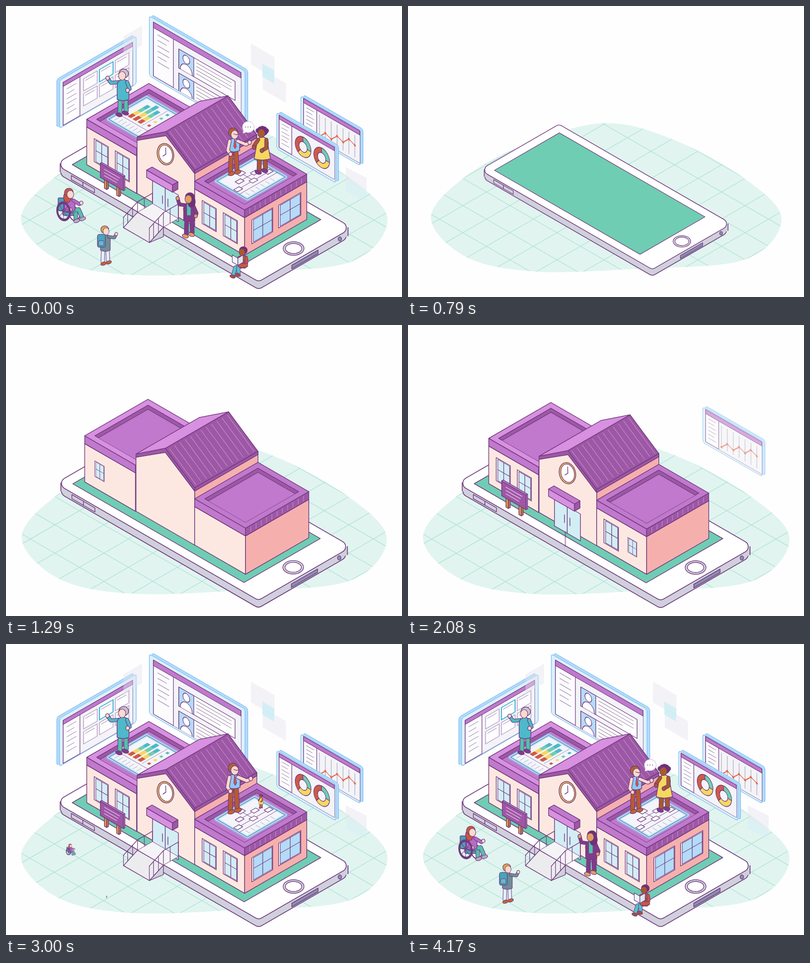
These frames come from a looping animation (873 by 642 pixels, 10 s). An HTML page with a canvas:

```html
<!DOCTYPE html>
<html lang="en">
<head>
<meta charset="utf-8">
<title>School on a phone</title>
<style>
html, body { margin: 0; width: 100%; height: 100%; overflow: hidden; background: #fefefe; }
canvas { display: block; width: 873px; height: 642px; }
</style>
</head>
<body>
<canvas id="stage" width="873" height="642"></canvas>
<script>
const W = 873, H = 642, LOOP = 10000, HOLD = 210, FADE = 250;
const K = Math.tan(Math.PI / 6);
const main = document.getElementById('stage').getContext('2d');
const buffer = document.createElement('canvas');
buffer.width = W; buffer.height = H;
const layer = buffer.getContext('2d');
let g = main, now = 0;

const INK = '#713a7e', PURPLE = '#c079cc', LILAC = '#d890e0', DARK = '#9d58a5', GREEN = '#6fcdb3',
  GREY = '#d0d0dc', CREAM = '#fde8e1', PINK = '#f5b0ae', GLASS = '#d3edf5', SKY = '#b4dbf7', BLUE = '#85c1f3',
  TEAL = '#4db9ca', SKIN = '#fbd9cd', BROWN = '#a9592c', RUST = '#c4632e', YELLOW = '#f6d75f', RED = '#cf5a47',
  PLUM = '#803b89', TEXT = '#8d7599', HAZE = 'rgba(226,226,238,.45)';

// --- drawing helpers ---
function paint(fill, stroke, lw = 1.5) {
  if (fill) { g.fillStyle = fill; g.fill(); }
  if (stroke) { g.strokeStyle = stroke; g.lineWidth = lw; g.stroke(); }
}
function trace(points) {
  const p = points.flat();
  g.beginPath();
  for (let i = 0; i < p.length; i += 2) g.lineTo(p[i], p[i + 1]);
}
function poly(p, fill, stroke = INK, lw) { trace(p); g.closePath(); paint(fill, stroke, lw); }
function line(p, color = INK, lw = 1.5) { trace(p); paint(null, color, lw); }
function ell(x, y, rx, ry, fill, stroke = INK, lw = 1.4, rot = 0) {
  g.beginPath(); g.ellipse(x, y, rx, ry, rot, 0, 7); paint(fill, stroke, lw);
}
function rect(x, y, w, h, fill, stroke, lw, r = 0) {
  g.beginPath(); g.roundRect(x, y, w, h, r); paint(fill, stroke, lw);
}
function limb(p, color, w) { line(p, INK, w + 2.6); line(p, color, w); }
function place(matrix, fn) { g.save(); g.transform(...matrix); fn(); g.restore(); }
const skew = (x, y, k, fn) => place([1, k, 0, 1, x, y], fn);
function scaled(s, x, y, fn) {
  if (s > 0.012) place([s, 0, 0, s, x - s * x, y - s * y], fn);
}
function fade(alpha, fn) {
  if (alpha <= 0) return;
  if (alpha >= 1) return fn();
  layer.clearRect(0, 0, W, H);
  g = layer; fn(); g = main;
  g.save(); g.globalAlpha = alpha; g.drawImage(buffer, 0, 0); g.restore();
}

// --- isometric helpers: a runs down-right, b up-right, h is height ---
const iso = (x, y) => (a, b, h = 0) => [x + a + b, y + K * (a - b) - h];
function floor(m, a0, a1, b0, b1, h, fill, stroke, lw) {
  poly([m(a0, b0, h), m(a0, b1, h), m(a1, b1, h), m(a1, b0, h)], fill, stroke, lw);
}
function front(m, a0, a1, b, h0, h1, fill) {
  poly([m(a0, b, h0), m(a1, b, h0), m(a1, b, h1), m(a0, b, h1)], fill);
}
function side(m, a, b0, b1, h0, h1, fill) {
  poly([m(a, b0, h0), m(a, b1, h0), m(a, b1, h1), m(a, b0, h1)], fill);
}
function box(m, a, b, h0, h1, left, right, top) {
  front(m, 0, a, 0, h0, h1, left);
  side(m, a, 0, b, h0, h1, right);
  if (top) floor(m, 0, a, 0, b, h1, top);
}

// --- motion ---
function spring(start, over = 1) {
  if (now <= start) return 0;
  const x = (now - start) * 0.0095;
  const d = Math.exp(-0.855 * x) * (Math.cos(x) + 0.855 * Math.sin(x));
  return d < 0 ? 1 - d * over : 1 - d;
}
const ramp = (start, len) => Math.min(1, Math.max(0, (now - start) / len));
const pop = (start, x, y, fn) => scaled(spring(start), x, y, fn);
function drop(start, fn) {
  const off = -30 * (1 - ramp(start, 500)) ** 3;
  fade(ramp(start, 130), () => place([1, 0, 0, 1, 0, off], fn));
}

// --- ground and phone ---
function ground() {
  const p = [[432, 251], [587, 287], [755, 378], [841, 472], [755, 566], [503, 587],
    [272, 593], [115, 560], [33, 470], [110, 376], [255, 298]];
  const at = i => p[(i + p.length) % p.length];
  const lean = (i, d, c) => at(i)[c] + d * (at(i + 1)[c] - at(i - 1)[c]) / 6;
  g.save();
  g.beginPath(); g.moveTo(...p[0]);
  p.forEach((_, i) => g.bezierCurveTo(lean(i, 1, 0), lean(i, 1, 1),
    lean(i + 1, -1, 0), lean(i + 1, -1, 1), ...at(i + 1)));
  paint('#e1f4f0');
  g.clip();
  const m = iso(486, 284.5);
  for (let i = -10; i <= 10; i++) {
    const d = i * 54.2;
    line([m(-900, d), m(900, d)], '#b5e5d8', 1.6);
    line([m(d, -900), m(d, 900)], '#b5e5d8', 1.6);
  }
  g.restore();
}
function slab(m, h, fill) {
  const c = [m(0, 0, h), m(0, 206, h), m(449, 206, h), m(449, 0, h)];
  g.beginPath(); g.moveTo(...m(0, 103, h));
  for (let i = 1; i < 5; i++) g.arcTo(...c[i % 4], ...c[(i + 1) % 4], 13);
  g.closePath(); paint(fill, INK, 1.8);
}
function phone() {
  const m = iso(108, 349);
  slab(m, -17, GREY);
  poly([[119.5, 349], [754, 490], [754, 507], [557, 608], [119.5, 366]], GREY, null);
  for (const [x, y] of [[119.5, 348], [754, 489]]) line([x, y, x, y + 18], INK, 1.8);
  slab(m, 0, '#fff');
  floor(iso(146, 350), 0, 379, 0, 169, 0, GREEN);
  const keys = iso(144, 383), port = iso(630, 580);
  front(keys, 0, 25.5, 0, 0, 9, GREY);
  front(keys, 25.5, 51, 0, 0, 9, GREY);
  side(port, 0, 0, 58, 0, 8, '#8b8fb0');
  ell(736, 514, 3.8, 4.8, '#8b8fb0');
  ell(634, 535, 23, 15, GREY);
  ell(634, 535, 18, 11, '#fff');
}

// --- building ---
function win(start, [x, y], w, h, k, glass) {
  pop(start, x + w / 2, y + h / 2 + k * w / 2, () => skew(x, y, k, () => {
    rect(0, 0, w, h, '#fff', INK);
    rect(3.5, 2, w - 5, h - 4, glass, INK, 1.2);
    line([w / 2 + 1, 2, w / 2 + 1, h - 2], INK, 1.3);
    line([3.5, h * 0.48, w - 2, h * 0.48], INK, 1.3);
  }));
}
function wing(m, rim, start) {
  const a = 110, b = 137, in0 = 11;
  box(m, a, b, 0, 83, CREAM, PINK);
  box(m, a, b, 83, 100, PURPLE, DARK, rim);
  for (let i = 1; i < 12; i++) line([m(a, i * b / 12, 86), m(a, i * b / 12, 97)], '#cb8fd3', 1.1);
  g.save();
  floor(m, in0, a - in0, in0, b - in0, 100, DARK);
  g.clip();
  floor(m, in0, a - in0, in0, b - in0, 91, PURPLE, INK, 1.2);
  g.restore();
  win(start, m(16.5, 0, 67), 31, 51, K, GLASS);
  win(start + 125, m(63, 0, 67), 31, 51, K, GLASS);
}
// chart area on a roof in unit coordinates: u up-right, v down-right
function roofChart(m, draw) {
  const p = (u, v) => m(24 + 68 * v, 24 + 84 * u, 100);
  const tile = (u, v, w, h, fill, stroke, lw) =>
    poly([p(u, v), p(u + w, v), p(u + w, v + h), p(u, v + h)], fill, stroke, lw);
  tile(0, 0, 1, 1, null, 'rgba(120,220,245,.35)', 11);
  tile(0, 0, 1, 1, '#f4f4fa', '#a9e6f7', 6);
  tile(0, 0, 1, 1, null, INK, 1);
  draw(p, tile);
}
function barChart(p, tile) {
  line([p(0.25, 0), p(0.25, 1)], INK, 0.8);
  line([p(0.3, 0.72), p(0.96, 0.72)], TEXT, 0.8);
  for (let i = 0; i < 7; i++) line([p(0.06, 0.12 + i * 0.12), p(0.18, 0.12 + i * 0.12)], '#aaa0b8', 1);
  const colors = [RED, YELLOW, GREEN, TEAL];
  for (let r = 0; r < 3; r++) {
    const len = 0.62 - 0.1 * Math.abs(r - 1);
    colors.forEach((c, i) => tile(0.32 + i * len / 4, 0.22 + r * 0.16, len / 4, 0.11, c, null));
  }
  colors.forEach((c, i) => tile(0.36 + i * 0.16, 0.8, 0.06, 0.07, c, null));
}
function treeChart(p, tile) {
  line([p(0, 0.74), p(1, 0.74)], INK, 0.9);
  line([p(0.5, 0.18), p(0.5, 0.6)], INK, 1);
  for (let row = 0; row < 3; row++) {
    const v = 0.18 + row * 0.2, span = row * 0.2;
    line([p(0.5 - span, v), p(0.5 + span, v)], INK, 1);
    for (let i = 0; i <= row; i++) tile(0.43 - span + i * 0.4, v - 0.06, 0.14, 0.12, '#fff', INK, 1.3);
  }
  for (let i = 0; i < 6; i++) line([p(0.12 + i * 0.13, 0.8), p(0.12 + i * 0.13, 0.93)], '#aaa0b8', 1);
}
function house() {
  const m = iso(289, 413.5), a = 127, mid = a / 2, b = 137, eave = 124, ridge = 173, t = 7;
  side(m, a, 0, b, 98, eave, PINK);
  poly([m(0, 0), m(0, 0, eave - t), m(mid, 0, ridge - t), m(a, 0, eave - t), m(a, 0)], CREAM);
  poly([m(0, 0, eave), m(0, b, eave), m(mid, b, ridge), m(mid, 0, ridge)], LILAC);
  poly([m(mid, 0, ridge), m(mid, b, ridge), m(a, b, eave), m(a, 0, eave)], DARK);
  for (let i = 0.5; i < 12; i++) {
    const d = i * b / 12;
    line([m(mid + 3, d, ridge - 2), m(a - 3, d, eave + 2)], '#cb8fd3', 1.1);
  }
  side(m, a, 0, b, eave - t, eave, DARK);
  poly([m(0, 0, eave), m(mid, 0, ridge), m(a, 0, eave),
    m(a, 0, eave - t), m(mid, 0, ridge - t - 2), m(0, 0, eave - t)], DARK);
  pop(1400, 352, 327, () => {
    ell(351.5, 327, 18, 24, '#e9bd55', INK, 1.5, -0.25);
    ell(352, 327, 14.5, 20.5, '#fff', INK, 1.3, -0.25);
    line([352, 313, 352.5, 327, 346, 331]);
  });
  pop(1540, 347, 410, () => {
    skew(323, 384, K, () => {
      rect(0, 0, 57, 59, GLASS, INK);
      line([28, 0, 28, 59]);
      for (const x of [22, 34]) line([x, 22, x, 39]);
    });
    box(iso(310, 378), 57, 12, 0, 16, LILAC, DARK, PURPLE);
  });
}
function building() {
  const left = iso(178, 350), right = iso(416, 486.5);
  wing(left, LILAC, 1150);
  drop(2430, () => roofChart(left, barChart));
  house();
  wing(right, PURPLE, 1820);
  win(2190, right(110, 16, 69), 46, 53, -K, SKY);
  win(2374, right(110, 75, 67), 49, 50, -K, SKY);
  drop(2180, () => roofChart(right, treeChart));
}
function sign() {
  for (const x of [217, 244]) box(iso(x, 402 + (x - 217) * K), 5, 4, 0, 24, '#e59a48', '#c97b35');
  box(iso(208, 378), 51, 3, 0, 31, DARK, PURPLE, LILAC);
  skew(208, 347, K, () => {
    for (let i = 0; i < 3; i++) line([9, 8 + i * 7, 42 - i * 3, 8 + i * 7], '#f0c3f2');
  });
}
function stairs() {
  const q = ramp(2060, 580), dx = -31 * q, dy = 34 * q;
  if (!q) return;
  const m = iso(290, 455), top = m(57, 0);
  const rail = ([x, y], h) => {
    const reach = 33 * q;
    line([x + dx, y + dy - h, x, y - h, x + reach, y - h - reach * K]);
    for (const f of [0, 0.35, 0.7, 1]) line([x + dx * f, y + dy * f - h, x + dx * f, y + dy * f], INK, 1.3);
    for (const f of [0.45, 1]) {
      const px = x + reach * f, py = y - reach * f * K;
      line([px, py - h, px, py], INK, 1.3);
    }
  };
  g.globalAlpha = ramp(2200, 150);
  floor(m, 0, 57, 0, 33, 0, '#f4f4f6', INK, 1);
  poly([top, [top[0], top[1] + 21], [top[0] + dx, top[1] + dy]], GREY);
  poly([m(0, 0), top, [top[0] + dx, top[1] + dy], [290 + dx, 455 + dy]], '#ececef');
  g.globalAlpha = ramp(2060, 100);
  rail(top, 32);
  g.globalAlpha = ramp(2350, 150);
  rail(m(0, 0), 23);
  g.globalAlpha = 1;
}

// --- floating screens ---
function frame(x, y, w, h, dir) {
  skew(x, y, K * dir, () => {
    for (let i = 3; i > 0; i--) rect(dir * 2 * i, -2 * i, w, h, '#b4dbfa', i > 2 ? BLUE : null, 1.5, 5);
    rect(0, 0, w, h, '#dcf0fa', BLUE, 1.5, 5);
  });
}
function panel(x, y, w, h, dir, bar, div, gap, fn) {
  skew(x, y, K * dir, () => {
    g.save();
    rect(0, 0, w, h, '#fcfcff', INK);
    g.clip();
    rect(div, bar, w - div, h, '#f3f3f8');
    fn();
    g.restore();
    rect(0, 0, w, bar, PURPLE, INK, 1.3);
    line([div, bar, div, h], INK, 1.3);
    for (let i = 0; i < 6; i++) {
      const y = bar + gap * (i + 0.9);
      line([div * 0.22, y, div * (i % 3 === 1 ? 0.66 : 0.78), y], TEXT, 1.1);
    }
  });
}
function lineScreen() {
  frame(650, 198.5, 131, 78, 1);
  panel(656, 204, 124, 71, 1, 9, 29, 8.5, () => {
    const p = Array.from({ length: 7 }, (_, i) => [35 + i * 13, 58 - i * 4.2 + (i % 2 ? -5 : 5)]);
    for (const [x] of p) line([x, 16, x, 64], '#a9a3b4', 1.2);
    line(p, '#e2694e', 1.8);
    for (const [x, y] of p) ell(x, y, 2.4, 2.4, '#e2694e', null);
  });
}
function donut(x, y) {
  const cut = [-1.6, 0.1, 2.3, 4.68], colors = [GREEN, YELLOW, RED];
  place([1, 0.5, 0, 1.25, x, y], () => colors.forEach((c, i) => {
    g.beginPath();
    g.arc(0, 0, 17.5, cut[i], cut[i + 1]);
    g.arc(0, 0, 9, cut[i + 1], cut[i], true);
    g.closePath(); paint(c, INK, 1.2);
  }));
}
function donutScreen() {
  frame(597, 235, 130, 80, 1);
  panel(602, 241, 122, 71, 1, 8, 28, 8.5, () => {});
  donut(655, 311); donut(696, 335);
}
function profileScreen() {
  frame(316, 22, 211, 132, 1);
  panel(325, 35.5, 193, 119, 1, 12, 44, 12, () => {
    for (const y of [27, 80]) {
      rect(56, y, 124, 42, '#fff', INK, 1.4);
      g.save();
      rect(56, y, 33, 42, SKY, INK, 1.4);
      g.clip();
      ell(72.5, y + 40, 13, 15, '#fff');
      ell(72.5, y + 14, 7.5, 9, '#fff');
      g.restore();
      for (let i = 1; i < 5; i++) line([95, y + i * 8, i === 4 ? 148 : 172, y + i * 8], TEXT, 1.1);
    }
  });
}
function tileScreen() {
  frame(118, 164, 169, 106, -1);
  panel(126, 168.5, 153, 95, -1, 9, 37, 11, () => {
    for (let i = 0; i < 6; i++) {
      const x = 45 + i % 3 * 35, y = 18 + (i > 2 ? 33 : 0), hot = i === 1;
      rect(x, y, 30, 27, '#fdfdff', hot ? '#3db4d3' : '#b49bc1', hot ? 2.2 : 1.5);
      line([x + 4, y + 6, x + 24, y + 6], TEXT, 1);
    }
  });
}
function tints() {
  const tint = (x, y, w, h, k, color = HAZE) => skew(x, y, k, () => rect(0, 0, w, h, color));
  tint(259, 67, 41, 43, -K);
  tint(540, 83, 52, 46, K);
  tint(566, 141, 51, 43, K);
  tint(565, 127, 26, 29, K, 'rgba(200,238,245,.75)');
  tint(749, 356, 46, 28, 0.5);
  tint(749, 384, 46, 24, 0.5, 'rgba(212,236,248,.4)');
}

// --- people: feet at the origin, head 86 above; dir is the way they look ---
function person(x, y, o) {
  const { s = 1, dir = 1, coat, pants, shoes = PLUM, skin = SKIN, hair, hem = -46, flare = 0,
    sleeve = coat, hands = [], seat } = o;
  const arm = ([hx, hy], i) => {
    const sx = i ? 9 : -9, out = i ? 5 : -5;
    const elbow = [(sx + hx) / 2 + out, (hy - 70) / 2 + 6];
    limb([[sx, -70], elbow, [hx, hy]], sleeve, 6);
    ell(hx, hy, 4, 4.5, skin);
  };
  place([s, 0, 0, s, x, y], () => {
    if (o.behind) o.behind();
    for (const d of [-7, 7]) {
      const foot = seat ? [seat[2] + d, seat[3] - d / 3] : [d, -d / 4];
      const knee = seat ? [seat[0] + d / 2, seat[1] - d / 3] : [d * 0.9, -26];
      limb([[d * 0.7, -46], knee, [foot[0], foot[1] - 5]], pants, 8);
      ell(foot[0] + dir * 2, foot[1], 7.5, 4.2, shoes, INK, 1.3, -0.3 * dir);
    }
    if (hands[0] && !o.armsOver) arm(hands[0], 0);
    g.beginPath();
    g.moveTo(-7, -74);
    g.quadraticCurveTo(0, -78, 7, -74);
    g.quadraticCurveTo(15, -70, 13, -56);
    g.lineTo(13 + flare, hem);
    g.quadraticCurveTo(0, hem + 6, -13 - flare, hem);
    g.lineTo(-13, -56);
    g.quadraticCurveTo(-15, -70, -7, -74);
    g.closePath(); paint(coat, INK);
    if (o.detail) o.detail();
    if (hands[0] && o.armsOver) arm(hands[0], 0);
    if (hands[1]) arm(hands[1], 1);
    if (o.long) ell(-dir * 5, -78, 9, 13, hair);
    if (o.curls) for (let i = 0; i < 5; i++) ell(-9 + i * 4.5, -90 - 5 * Math.sin(i * 0.8), 5, 5, hair);
    ell(-dir * 1.5, -89, 10.5, 10, hair);
    ell(dir * 2, -84, 8, 9.5, skin, INK, 1.2);
    if (o.glasses) line([[0, -86], [5, -84], [10, -85]], INK, 1.3);
    if (o.front) o.front();
  });
}
const elder = () => person(258, 238, { dir: -1, coat: TEAL, pants: '#55bfae', hair: '#c9c3cf', hem: -32,
  hands: [[-34, -79], [10, -52]] });
const teacher = () => person(502, 368, { coat: '#8fc7f3', sleeve: SKIN, pants: '#b85a31', shoes: RUST,
  hair: '#b0622f', hem: -49, glasses: true, armsOver: true, hands: [[-7, -41], [35, -67]],
  detail: () => poly([[2, -75], [6, -58], [3, -53], [0, -58]], RED, INK, 1) });
const mother = () => person(565, 365, { dir: -1, coat: YELLOW, sleeve: BROWN, skin: BROWN, pants: BROWN,
  hair: '#702f76', hem: -28, flare: 5, curls: true, armsOver: true, hands: [[-18, -53], [-1, -46]] });
const waver = () => person(404, 506, { s: 0.95, dir: -1, coat: PLUM, pants: PLUM, shoes: '#dfa05c', skin: '#dfa05c',
  hair: '#702f76', hem: -34, long: true, hands: [[-27, -86], [15, -45]],
  detail: () => poly([[-6, -75], [4, -75], [4, -46], [-6, -46]], '#55bfae', INK, 1.1) });
const pupil = () => person(219, 567, { s: 0.83, coat: '#6f8d98', pants: '#e2f0fa', shoes: RUST, hair: '#d9a547',
  hem: -34, hands: [null, [29, -77]],
  front: () => {
    rect(-21, -76, 21, 34, '#46a5bb', INK, 1.6, 5);
    rect(-18, -59, 14, 13, '#62bccd', INK, 1.2, 2);
  } });
const rider = () => person(140, 494, { s: 0.93, coat: '#b56cc5', pants: '#55bfae', shoes: '#b9a9c4', hair: '#c9573f',
  long: true, seat: [18, -46, 22, -24], hands: [[2, -48], [28, -64]], armsOver: true,
  behind: () => {
    rect(-27, -76, 14, 30, '#4a9fb9', INK, 1.5, 3);
    ell(12, -38, 12, 16, '#fff', INK, 2.5, -0.2);
    rect(-16, -50, 34, 16, '#4a9fb9', INK, 1.5, 4);
  },
  front: () => {
    place([1, 0.15, 0, 1.35, -14, -44], () => {
      ell(0, 0, 15, 15, null, INK, 4.5);
      for (let i = 0; i < 8; i++) line([[0, 0], [14 * Math.cos(i * Math.PI / 4), 14 * Math.sin(i * Math.PI / 4)]], INK, 1);
    });
  } });
const reader = () => person(522, 613, { s: 0.83, dir: -1, coat: '#c9573f', pants: '#57bfd0', shoes: '#a5503a',
  skin: BROWN, hair: '#702f76', seat: [-16, -46, -18, -22], hands: [[-22, -66], [2, -58]],
  front: () => {
    const m = iso(-28, -58);
    front(m, 0, 15, 0, 0, 19, '#f0f4fa');
    side(m, 15, 0, 14, 0, 19, '#d8e8f4');
  } });
function bubble() {
  ell(534, 267, 13, 12.5, '#fff', '#c9b5d0', 1);
  poly([[524, 273], [522, 281], [531, 278]], '#fff', null);
  for (let i = -1; i < 2; i++) ell(533.5 + i * 5.5, 267, 1.3, 1.3, '#9a86a6', null);
}

function scene(t) {
  now = t;
  scaled(spring(572), 437, 425, ground);
  scaled(spring(608, 0.4), 437, 432, phone);
  drop(2370, profileScreen);
  drop(2430, tileScreen);
  drop(2000, lineScreen);
  drop(2200, donutScreen);
  fade(ramp(2560, 350), tints);
  pop(806, 420, 550, building);
  pop(1690, 235, 405, sign);
  stairs();
  pop(2500, 257, 222, elder);
  pop(2670, 500, 360, teacher);
  pop(2924, 561, 360, mother);
  pop(2916, 143, 461, rider);
  pop(2970, 222, 560, pupil);
  pop(3060, 405, 495, waver);
  pop(3190, 528, 278, bubble);
  pop(3270, 513, 586, reader);
}

function wash(alpha) {
  g.globalAlpha = alpha;
  g.fillStyle = '#fefefe';
  g.fillRect(0, 0, W, H);
  g.globalAlpha = 1;
}
function draw(ms) {
  const t = ms % LOOP;
  g.lineJoin = g.lineCap = layer.lineJoin = layer.lineCap = 'round';
  wash(1);
  if (t >= HOLD + FADE) return scene(t);
  scene(LOOP);
  if (t >= HOLD) wash((t - HOLD) / FADE);
}

const begin = performance.now();
function tick() {
  draw(Math.max(0, performance.now() - begin));
  requestAnimationFrame(tick);
}
tick();
</script>
</body>
</html>
```
